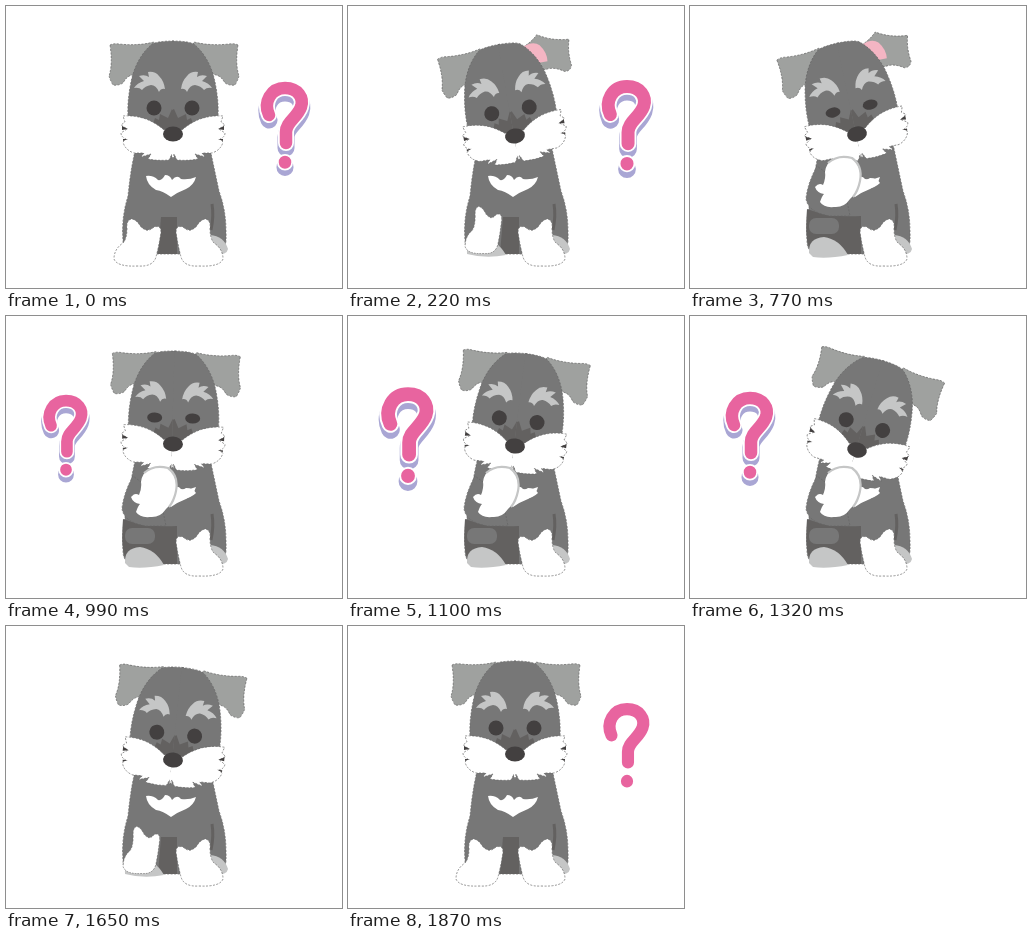
Recreate the animation shown at these times as an HTML page. Size 336 px wide and 282 px high, loop 1980 ms.

```html
<!DOCTYPE html>
<html>
<head>
<meta charset="utf-8">
<style>
html, body { margin: 0; height: 100%; overflow: hidden; background: #fff; }
svg { display: block; width: 100vw; height: 100vh; }
.coat { fill: #777; }
.dark { fill: #636160; }
.ear { fill: #9fa19f; }
.pale { fill: #c5c6c6; }
.ink { fill: #434040; }
.white { fill: #fff; }
.edge { stroke: #666; stroke-width: .7; stroke-dasharray: 2 1.5; }
#mark { fill: none; stroke-linecap: round; stroke-linejoin: round; }
</style>
</head>
<body>
<svg viewBox="0 0 336 282">
  <defs>
    <path id="paw" class="white edge" d="M170 226Q170 219 177 221Q181 225 185 224Q190 222 192 218Q196 213 200 213Q205 215 204 222Q204 233 208 237Q217 243 217 253Q214 261 193 260Q178 261 175 251Q172 240 170 226Z"/>
    <path id="hook" d="M263 109C257 96 265 82 279 82C292 82 298 92 295 101C291 112 280 116 280 126V137M279 156v.5"/>
  </defs>

  <!-- body -->
  <path class="coat edge" d="M131 138Q125 158 122 190Q115 212 117 235Q117 248 130 248H214Q221 246 220 225Q220 204 213 185L203 138Z"/>
  <path class="dark" d="M155 211H171V248H152Z"/>
  <path class="pale" d="M204 229Q218 230 222 243Q221 250 205 249Z"/>
  <path d="M206 198Q208 210 205 224" fill="none" stroke="#636160" stroke-width="3"/>
  <path class="white" d="M140 170Q147 169 152 174Q156 175 159 169Q164 169 166 174Q171 168 175 173Q183 174 190 171Q188 179 180 183Q172 186 165 191Q157 185 150 184Q141 179 140 170Z"/>
  <path id="footBack" class="pale" d="M119 248Q118 234 132 231Q149 233 158 249Q138 253 119 248Z"/>
  <g id="legUp">
    <path class="dark" d="M117 203Q140 212 171 210V248H123Q114 240 117 203Z"/>
    <rect class="coat" x="119" y="212" width="30" height="16" rx="7"/>
    <path class="pale" d="M119 247Q118 232 134 231Q149 233 158 249Q138 253 123 251Z"/>
  </g>
  <use href="#paw"/>
  <g id="pawDown"><use href="#paw" transform="translate(325) scale(-1 1)"/></g>

  <g id="head">
    <path id="ear" class="ear edge" d="M104 39Q108 37 113 38Q132 40 148 36L160 60L126 69Q121 70 117 77Q112 80 107 79Q104 74 103 70Q107 58 104 39Z"/>
    <use id="earRest" href="#ear" transform="translate(336) scale(-1 1)"/>
    <g id="earFlip">
      <path class="ear edge" d="M190 42Q200 38 206 32Q220 41 237 42Q233 55 235 68Q233 74 227 73Q217 66 208 68L190 62Z"/>
      <path fill="#f4b5c3" d="M190 42Q201 37 207 43Q213 51 212 60L198 60Z"/>
    </g>
    <g id="half">
      <path class="coat edge" d="M168 35Q152 35 146 38C132 50 127 66 125 76Q121 95 122 112L127 140H168"/>
      <path class="pale" d="M128 82Q131 77 138 75L133 70Q139 68 143 71L142 66Q149 65 153 70Q158 75 159 83Q155 82 153 86Q150 79 145 79Q139 80 136 84Q133 81 128 82Z"/>
      <path class="dark" d="M147 118L149 112L153 114L154 108L162 112L166 103L168 104V128H156Z"/>
      <ellipse id="eye" class="ink" cx="148" cy="102" rx="7.5" ry="7.5"/>
      <path class="white edge" d="M168 122L158 124Q150 117 140 113Q128 109 117 110L119 116L115 119L121 123L115 127Q115 131 120 133L117 136Q119 144 128 147L138 147L135 151L145 148L142 153Q152 155 163 154L166 148L168 153"/>
      <path class="ink" d="M116 120l6 3l-6 1zM117 135l5 -2l-5 0z"/>
    </g>
    <use href="#half" transform="translate(334) scale(-1 1)"/>
    <ellipse class="ink" cx="167" cy="128" rx="10" ry="7.5"/>
  </g>

  <g id="armUp">
    <path class="coat edge" d="M127 160Q118 176 116 192Q117 206 140 210H160L154 180Z"/>
    <path class="white" d="M125 181Q129 176 133 179Q136 172 135 166Q136 157 143 153Q153 148 163 153Q172 161 170 174Q167 187 160 193Q154 202 144 201Q134 202 130 196Q132 190 134 188Q127 187 125 181Z"/>
    <path class="white" d="M166 176Q174 176 180 172Q187 172 190 177Q185 182 177 183Q172 187 164 188Z"/>
    <path d="M138 157Q148 148 162 152Q173 160 170 175Q168 185 163 191" fill="none" stroke="#c5c6c6" stroke-width="2.2"/>
  </g>

  <g id="mark">
    <use id="shadow" href="#hook" y="5" stroke="#a9a6d4" stroke-width="17"/>
    <use href="#hook" stroke="#fff" stroke-width="16"/>
    <use href="#hook" stroke="#e8649f" stroke-width="12.5"/>
  </g>
</svg>
<script>
const STEP = 110, STEPS = 18;
const tilt = [0, -4, -10, -16, -20, -20, -17, -12, -5, 1.5, 7, 13, 16.5, 16.5, 12, 6, 2, 0];
const drop = [0, 1, 2, 2, 1, -1, -2, 0, 0, 0, 2, 4, 6, 6, 6, 6, 3, 0];
const blink = { 7: 5, 8: 2, 9: 5 };
// question mark size at each step; absent means hidden
const pop = { 17: .97, 0: 1, 1: 1.1, 2: 1.04, 3: 1, 4: 1, 5: 1, 9: .93, 10: 1.1, 11: 1.04, 12: 1, 13: 1 };
const lift = { 1: .5, 2: 1, 15: 1, 16: .5 };

const $ = id => document.getElementById(id);
const show = (id, on) => $(id).style.display = on ? '' : 'none';
const move = (id, value) => $(id).setAttribute('transform', value);
const start = performance.now();

function pose(k) {
  const flipped = tilt[k] < -8;
  move('head', `translate(0 ${drop[k]}) rotate(${tilt[k]} 167 128)`);
  $('eye').setAttribute('ry', blink[k] || 7.5);
  show('earFlip', flipped);
  show('earRest', !flipped);

  const raised = k > 2 && k < 15, up = lift[k] || 0;
  show('armUp', raised);
  show('legUp', raised);
  show('pawDown', !raised);
  show('footBack', up);
  move('pawDown', `translate(${131 + 4 * up} ${236 - 12.5 * up}) scale(${1 - .22 * up} 1) translate(-131 -236)`);

  const size = pop[k];
  show('mark', size);
  show('shadow', k !== 17);
  if (size) move('mark', `translate(${k > 5 && k < 17 ? 60 : 279} 120) scale(${size}) translate(-279 -120)`);
}

function frame() {
  pose(Math.floor(Math.max(0, performance.now() - start) / STEP) % STEPS);
  requestAnimationFrame(frame);
}
frame();
</script>
</body>
</html>
```
